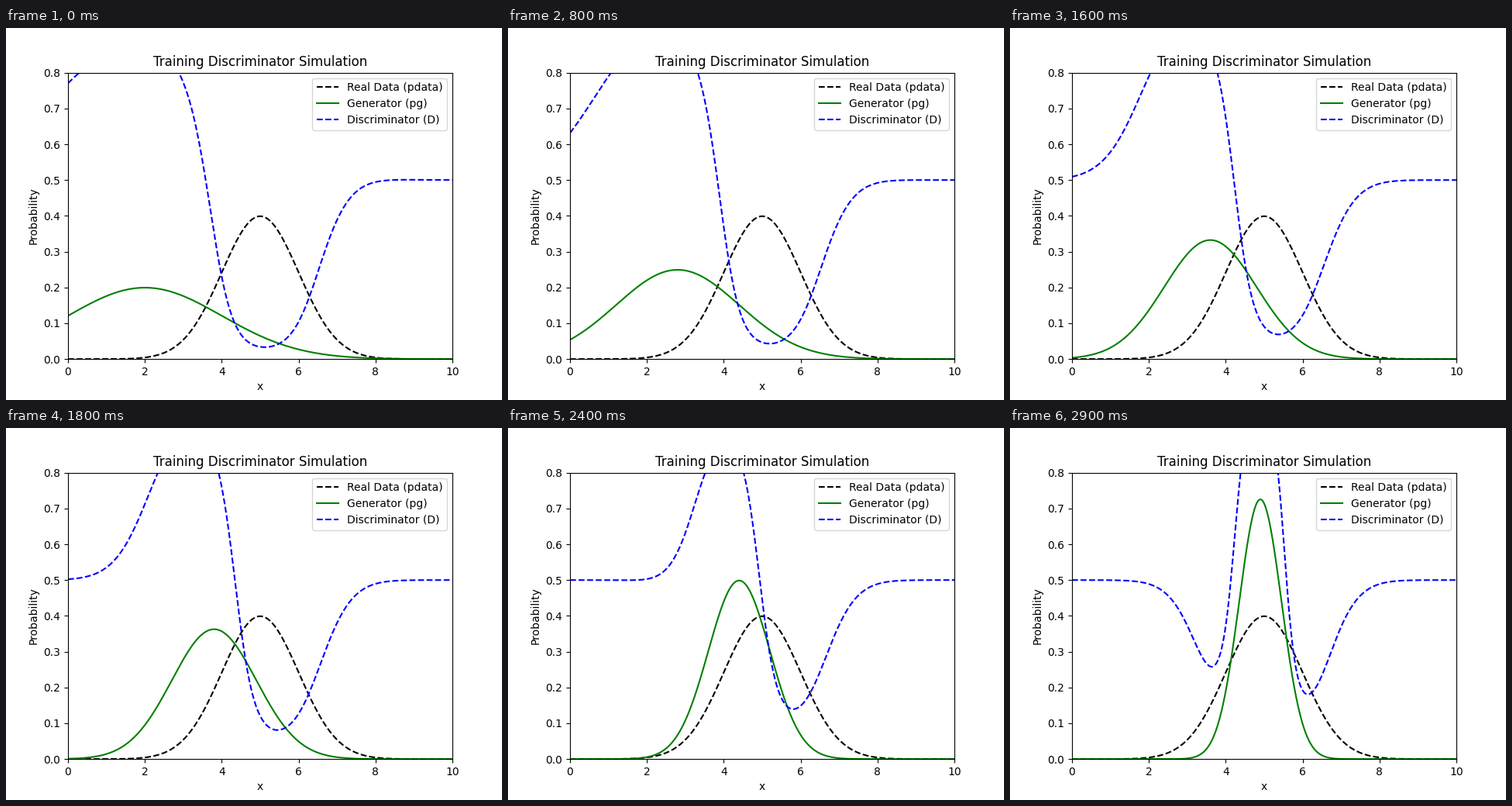
These frames come from a looping animation (640 by 480 pixels, 3000 ms). A matplotlib script:

```python
import numpy as np
import matplotlib.pyplot as plt
from matplotlib.animation import FuncAnimation

FRAMES = 30
INTERVAL = 100  # ms

x = np.linspace(0, 10, 1000)


def normal(mean, sigma):
    z = (x - mean) / sigma
    return np.exp(-z**2 / 2) / (sigma * np.sqrt(2 * np.pi))


def sigmoid(v):
    return 1 / (1 + np.exp(-v))


p_data = normal(5, 1)

fig, ax = plt.subplots(figsize=(6.4, 4.8), dpi=100)
ax.plot(x, p_data, "k--", label="Real Data (pdata)")
gen_line, = ax.plot([], [], color="green", label="Generator (pg)")
disc_line, = ax.plot([], [], "b--", label="Discriminator (D)")
ax.set_xlim(0, 10)
ax.set_ylim(0, 0.8)
ax.set_title("Training Discriminator Simulation")
ax.set_xlabel("x")
ax.set_ylabel("Probability")
ax.legend(loc="upper right")


def update(i):
    # The generator drifts towards the data and narrows at a steady rate.
    p_gen = normal(2 + 0.1 * i, 2 - 0.05 * i)
    gen_line.set_data(x, p_gen)
    disc_line.set_data(x, sigmoid(10 * (p_gen - p_data)))
    return gen_line, disc_line


anim = FuncAnimation(fig, update, frames=FRAMES, interval=INTERVAL, repeat=True)
plt.show()
```
